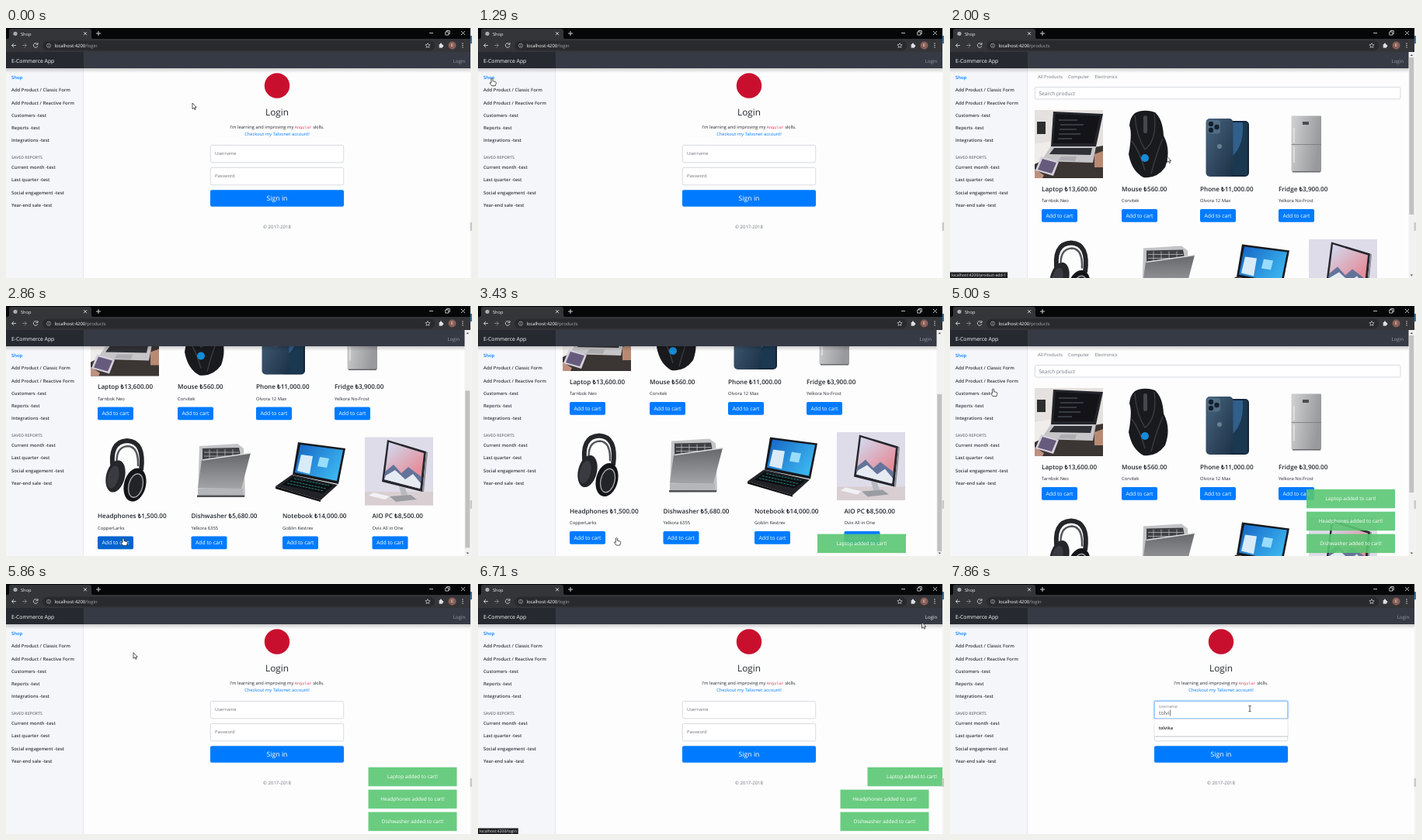
Recreate the animation shown at these times as an HTML page. Size 600 px wide and 323 px high, loop 8000 ms.

```html
<!DOCTYPE html>
<html lang="en">
<head>
<meta charset="utf-8">
<title>Shop</title>
<style>
  html, body { margin: 0; width: 100%; height: 100%; overflow: hidden; background: #fdfdfe; }
  svg { display: block; width: 100%; height: 100%; }
  text { font-family: 'Open Sans', 'Noto Sans', sans-serif; text-rendering: geometricPrecision; white-space: pre; }
  .semi { font-weight: 600; }
  .mid { text-anchor: middle; }
  .end { text-anchor: end; }
  .mono { font-family: 'Liberation Mono', monospace; font-size: 5.2px; fill: #e0405f; }
</style>
</head>
<body>
<svg id="stage" viewBox="0 0 600 323" preserveAspectRatio="none"></svg>
<script>
const STEP = 1000 / 7, LOOP = 8000;
const BLUE = '#007bff', INK = '#24282c', GRAY = '#70747a';

// ---- markup helpers ----
const text = (x, y, size, content, fill = INK, extra = '') =>
  `<text x="${x}" y="${y}" font-size="${size}" fill="${fill}" ${extra}>${content}</text>`;
const rect = (x, y, w, h, fill, extra = '') =>
  `<rect x="${x}" y="${y}" width="${w}" height="${h}" fill="${fill}" ${extra}/>`;
const poly = (points, fill, extra = '') => `<polygon points="${points}" fill="${fill}" ${extra}/>`;
const circle = (x, y, r, fill, extra = '') => `<circle cx="${x}" cy="${y}" r="${r}" fill="${fill}" ${extra}/>`;
const oval = (x, y, rx, ry, tilt, fill, extra = '') =>
  `<ellipse rx="${rx}" ry="${ry}" fill="${fill}" transform="translate(${x} ${y}) rotate(${tilt})" ${extra}/>`;
const line = (d, stroke, width = 1, extra = '') =>
  `<path d="${d}" fill="none" stroke="${stroke}" stroke-width="${width}" ${extra}/>`;
const shape = (d, fill, extra = '') => `<path d="${d}" fill="${fill}" ${extra}/>`;
const gradient = (id, from, to, vector) =>
  `<linearGradient id="${id}" ${vector}><stop stop-color="${from}"/><stop offset="1" stop-color="${to}"/></linearGradient>`;

const defs = `<defs>
  ${gradient('shadow', '#00000030', '#00000000', 'x2="0" y2="1"')}
  ${gradient('steel', '#d2d2d4', '#98999c', 'x2="1" y2="0.3"')}
  ${gradient('door', '#66676a', '#a3a4a7', 'x2="0" y2="1"')}
  ${gradient('navy', '#486580', '#1c3145', 'x2="1" y2="1"')}
  ${gradient('sky', '#cfe0f6', '#e48f9c', 'x2="0.6" y2="0.8"')}
  ${gradient('wave', '#1463c4', '#3bb4ef', 'x2="1" y2="0.6"')}
</defs>`;

// ---- browser window ----
function chrome() {
  return rect(0, 0, 598, 14, '#060708') + rect(0, 14, 598, 17, '#343539')
    + shape('M2 14Q4 14 4 11V4Q4 1 7 1H107Q110 1 110 4V11Q110 14 112 14Z', '#343539')
    + circle(12, 7.3, 2.6, '#a9abb0') + text(19, 9.5, 5.7, 'Shop', '#f0f0f1')
    + line('M100 5.2l4 4m0-4l-4 4M119 4v6m-3-3h6', '#e4e4e6', .9)
    + line('M545 6.5h5M565.8 5h4v4h-4zM567.3 5V3.5h4v4h-1.5M586 4l5 5m0-5l-5 5', '#e4e4e6', .8)
    + line('M13 22.5H7.5m2.6-2.6l-2.6 2.6 2.6 2.6', '#d5d6d8', .9)
    + line('M21 22.5h5.5m-2.6-2.6l2.6 2.6-2.6 2.6', '#85878b', .9)
    + line('M40.4 20.8A2.8 2.8 0 1 0 40.8 23.2M41 19v2.4h-2.4', '#d5d6d8', .9)
    + rect(47, 16.5, 505, 12.5, '#292a2d', 'rx="6.2"')
    + circle(55, 22.7, 2.5, 'none', 'stroke="#b5b7ba" stroke-width=".7"') + line('M55 22.3v1.8M55 21v.6', '#b5b7ba', .7)
    + `<text id="url" x="62.4" y="25" font-size="5.9" fill="#fff"></text>`
    + shape('M543 19.5l.9 2 2.2.2-1.7 1.5.5 2.2-1.9-1.2-1.9 1.2.5-2.2-1.7-1.5 2.2-.2z', 'none', 'stroke="#d5d6d8" stroke-width=".7"')
    + rect(557.7, 21, 4.4, 4.6, '#dedfe1') + circle(560, 20.7, 1.2, '#dedfe1') + circle(562.3, 23.2, 1.1, '#dedfe1')
    + circle(574.5, 22.5, 5, '#8b5f57') + text(574.5, 24.4, 5.4, 'E', '#fff', 'class="mid"')
    + [20, 22.5, 25].map(y => circle(588, y, .7, '#dcdcdc')).join('')
    + rect(598, 0, 2, 323, '#f3f3f4') + rect(598, 10, 2, 10, '#2a7ab8') + rect(597.5, 251, 2.5, 11, '#c9cacc');
}

function navbar() {
  return rect(0, 52, 598, 6, 'url(#shadow)') + rect(0, 31, 598, 21, '#363a45') + rect(0, 31, 100, 21, '#262930')
    + text(7, 44.5, 6.85, 'E-Commerce App', '#fff')
    + `<text id="loginLink" class="end" y="44.5" font-size="6.1">Login</text>`;
}

function sidebar() {
  const entry = (label, y, fill = '#34383d') => text(7, y + 2.1, 5.9, label, fill, 'class="semi"');
  const links = ['Shop', 'Add Product / Classic Form', 'Add Product / Reactive Form',
    'Customers -test', 'Reports -test', 'Integrations -test'];
  const reports = ['Current month -test', 'Last quarter -test', 'Social engagement -test', 'Year-end sale -test'];
  return rect(0, 52, 99, 271, '#f5f6fa') + rect(99, 52, .8, 271, '#e3e4e9')
    + links.map((label, i) => entry(label, 64 + i * 16.25, i ? undefined : BLUE)).join('')
    + text(7, 168.9, 5.2, 'SAVED REPORTS', GRAY, 'class="semi"')
    + reports.map((label, i) => entry(label, 180 + i * 16.2)).join('');
}

// ---- login page ----
function loginPage() {
  const field = y => rect(263.3, y, 171.4, 22.4, '#fff', 'rx="2" stroke="#ced2d8" stroke-width=".8"');
  return circle(349, 74.5, 16.2, '#c8102e')
    + text(349, 113, 11.8, 'Login', INK, 'class="mid"')
    + text(349, 130, 5.8, `I'm learning and improving my <tspan class="mono">Angular</tspan> skills.`, INK, 'class="mid"')
    + text(349, 138.7, 5.8, 'Checkout my Talvonet account!', BLUE, 'class="mid"')
    + field(151.4) + field(180.4) + text(269, 193.3, 5.7, 'Password', GRAY)
    + rect(263, 209.3, 172, 21.4, BLUE, 'rx="2"') + text(349, 223.2, 8.7, 'Sign in', '#fff', 'class="mid"')
    + text(349, 258.6, 6, '© 2017-2018', GRAY, 'class="mid"')
    + `<g id="label">${text(269, 164.2, 5.7, 'Username', GRAY)}</g>`
    + `<g id="focus">`
    + rect(262.6, 150.7, 172.8, 23.8, '#fff', 'rx="2.5" stroke="#bfdeff" stroke-width="2"')
    + rect(263.3, 151.4, 171.4, 22.4, '#fff', 'rx="2" stroke="#6fb0f5" stroke-width=".8"')
    + text(269, 160, 4.9, 'Username', GRAY)
    + `<text id="typed" x="269" y="169" font-size="6.9" fill="#50565c"></text>`
    + rect(0, 162.5, .6, 8, '#222', 'id="caret"') + `</g>`
    + `<g id="suggest">` + rect(264, 175.5, 171, 22.5, '#00000020', 'rx="1"')
    + rect(263, 174.5, 172, 22, '#fff', 'stroke="#d4d6d9" stroke-width=".5"')
    + text(268.5, 187.5, 5.7, 'tolvika', '#222', 'class="semi"') + `</g>`;
}

// ---- product page ----
const pictures = {
  laptop: rect(109, 106, 88, 88, '#3b3534') + poly('109,106 197,106 197,152 109,168', '#e4e1df')
    + rect(112, 121, 11, 16, '#2c2f2e') + poly('109,150 132,146 121,170 109,176', '#efece9')
    + poly('133,108 197,111 188,153 130,153', '#24252b') + poly('136,111 193,114 185,149 133,149', '#131318')
    + line('M140 119h24m-22 6h30m-31 6h22m-23 6h28m-29 6h18', '#59636d', 1)
    + poly('130,153 188,153 184,174 117,172', '#c6c5c8') + poly('134,155 183,155 181,164 128,163', '#303136')
    + poly('143,166 163,166 161,172 140,171', '#adacb0')
    + poly('109,182 121,190 119,194 109,194', '#bd9182')
    + poly('117,166 140,173 133,191 110,184', '#d6d2dc') + poly('119,169 137,174 131,188 113,183', '#665b7c')
    + poly('186,163 197,159 197,180 186,180', '#b98a72'),
  mouse: shape('M238 110Q249 104 264 109Q274 118 275 139Q285 158 277 180Q266 195 249 193Q234 185 230 163Q235 136 231 126Q232 115 238 110Z', '#191a1d')
    + line('M238 113Q240 140 251 157Q267 145 263 111M234 146Q245 161 251 184M274 143Q266 161 259 188', '#3a3c42', 1.4)
    + rect(249, 113, 5, 23, '#45474c', 'rx="2.5"') + circle(251, 168, 5, '#168bd8'),
  phone: rect(355, 120, 30, 72, '#15263a', 'rx="5"') + rect(357, 122, 26, 68, '#315f8c', 'rx="4"')
    + shape('M357 170Q379 158 377 122H383V190H361Q357 190 357 186Z', '#1a3850')
    + rect(329.5, 117, 35, 75, 'url(#navy)', 'rx="5"') + rect(331.5, 119, 16.5, 17.5, '#526e84', 'rx="4"')
    + [[336, 124], [336, 132], [343.5, 128]].map(([x, y]) => circle(x, y, 3.2, '#14212e')).join('') + circle(347, 153, 3, '#67818f'),
  fridge: rect(439.5, 113.5, 38.5, 72, 'url(#steel)', 'rx="1"') + line('M439.5 150.5H478', '#77787b', .8)
    + rect(454, 121, 8, 4, '#4b4d52') + line('M443 129v19M443 153v21', '#e8e8e9', 1.4) + rect(441, 185, 36, 1.5, '#66676a'),
  headphones: line('M138 212Q132 175 156 174Q179 175 174 212', '#25262a', 6)
    + line('M143 207Q140 182 157 181Q171 182 170 207', '#55575b', 2.5)
    + oval(141, 220, 12, 21, 14, '#25262a') + oval(138, 221, 7, 15, 14, '#3a3b40')
    + oval(166, 231, 14, 22, 14, '#141518') + oval(167, 232, 9, 15.5, 14, '#232428', 'stroke="#a4a6aa" stroke-width="1.4"'),
  dishwasher: poly('249,181 298,178 306,184 308,246 247,247', '#c3c4c6') + poly('253,184 300,183 303,199 253,200', '#3f4145')
    + line('M255 189h45M255 194h46M262 185v13M272 185v13M282 185v13M292 185v13', '#b9babd', .8)
    + poly('252,199 315,190 303,236 247,235', 'url(#door)') + line('M253 199L315 190', '#dcdddf', 1.5)
    + rect(247, 236, 58, 9, '#b5b6b9') + rect(246, 244.5, 61, 2.5, '#515256'),
  notebook: poly('376,176 437,184 428,230 369,218', '#17191d') + poly('379,179 434,186 426,226 372,215', 'url(#wave)')
    + poly('380,192 395,194 391,217 375,213', '#d9ebf7') + poly('404,195 416,197 413,209 401,207', '#9adcfb')
    + poly('368,218 427,231 405,251 347,233', '#222328') + poly('369,221 421,232 408,242 356,231', '#0c0d10')
    + line('M362 229l47 10M366 226l46 10M371 223l45 9', '#2b8f8a', .9, 'stroke-dasharray="3 1"')
    + poly('347,233 405,251 405,253 347,236', '#0b0b0d'),
  desktop: rect(462, 169.5, 88, 88, '#dfdce9') + rect(462, 240, 88, 17.5, '#d9cfd2')
    + poly('491,173 541,188 536,240 484,227', '#26272d') + poly('493,176 538,190 533,236 487,224', 'url(#sky)')
    + poly('488,214 499,205 509,216 518,208 535,221 533,236 487,224', '#647399')
    + poly('489,219 501,212 514,224 524,217 534,229 533,236 487,224', '#e6ebf3')
    + poly('506,233 514,235 518,247 510,247', '#b9bac0') + poly('494,246 521,244 529,250 502,253', '#9b9ca2')
    + poly('473,241 494,246 488,250 467,245', '#f2f1f5') + poly('541,188 543,189 538,240 536,240', '#8c8d95')
};

// Each row: vertical offset of its pictures, offset of its captions, and the items.
const rows = [
  { pictureY: 0, y: 0, items: [
    ['laptop', 118, 'Laptop ₺13,600.00', 'Tarnbok Neo'], ['mouse', 221, 'Mouse ₺560.00', 'Corvitek'],
    ['phone', 322, 'Phone ₺11,000.00', 'Olvora 12 Max'], ['fridge', 423, 'Fridge ₺3,900.00', 'Yelkora No-Frost']] },
  { pictureY: 103.5, y: 167, items: [
    ['headphones', 118, 'Headphones ₺1,500.00', 'CopperLarks'], ['dishwasher', 238.5, 'Dishwasher ₺5,680.00', 'Yelkora 6355'],
    ['notebook', 356, 'Notebook ₺14,000.00', 'Goblin Kestrev'], ['desktop', 471.5, 'AIO PC ₺8,500.00', 'Ovix All in One']] }
];

function product([id, x, title, maker], row) {
  return `<g transform="translate(0 ${row.pictureY})">${pictures[id]}</g>`
    + text(x, 210.8 + row.y, 8.15, title, INK, 'class="semi"') + text(x, 225 + row.y, 5.85, maker)
    + rect(x, 234 + row.y, 46, 16.8, BLUE, `rx="1.8" id="buy-${id}"`)
    + text(x + 23, 244.9 + row.y, 6.85, 'Add to cart', '#fff', 'class="mid"');
}

function productPage() {
  return `<g id="scroller">`
    + text(113, 64.5, 5.8, 'All Products', GRAY) + text(152, 64.5, 5.8, 'Computer', GRAY) + text(186.5, 64.5, 5.8, 'Electronics', GRAY)
    + rect(109.4, 76.4, 470.5, 15.5, '#fff', 'rx="1.8" stroke="#ced2d8" stroke-width=".8"')
    + text(114.5, 86.8, 6.6, 'Search product', GRAY)
    + rows.map(row => row.items.map(item => product(item, row)).join('')).join('') + `</g>`;
}

const scrollbar = rect(590.5, 31, 7.5, 292, '#f1f1f1') + shape('M592.5 36l1.8-2 1.8 2zM592.5 318.5l1.8 2 1.8-2z', '#555')
  + rect(591.3, 38, 5.9, 203, '#c1c1c1', 'id="thumb"');

// ---- overlays ----
const toasts = [
  { name: 'Laptop', enter: 24, leave: 47 },
  { name: 'Headphones', enter: 29, leave: 51 },
  { name: 'Dishwasher', enter: 33, leave: 54 }
];
const toastMarkup = toasts.map((toast, i) => `<g id="toast${i}">` + rect(0, 0, 114, 24.5, '#5ac773', 'opacity=".9"')
  + text(57, 14.6, 6.5, `${toast.name} added to cart!`, '#fff', 'class="mid"') + `</g>`).join('');

const cursors = {
  arrow: shape('M0 0V7.6L1.8 6 3 8.6 4.2 8 3.1 5.6H5.3Z', '#fff', 'stroke="#111" stroke-width=".7"'),
  hand: shape('M-1 .6Q0-.8 1 .6V3.6L4.8 4.6Q5.5 5 5.3 6.2L4.4 9.6H-.4L-3 6Q-2.6 4.8-1 5.9Z', '#fff', 'stroke="#111" stroke-width=".7"'),
  beam: line('M-1.6-3.8Q0-3.8 0-3Q0-3.8 1.6-3.8M0-3V3M-1.6 3.8Q0 3.8 0 3Q0 3.8 1.6 3.8', '#222', .8)
};

const stage = document.getElementById('stage');
stage.innerHTML = defs + rect(0, 0, 600, 323, '#fdfdfe')
  + `<g id="login">${loginPage()}</g><g id="products">${productPage()}</g>`
  + sidebar() + navbar() + `<g id="scrollbar">${scrollbar}</g>` + toastMarkup + chrome()
  + `<g id="status">${rect(0, 315.5, 0, 7.5, '#202124', 'id="statusBox"')}<text id="statusText" x="2" y="321" font-size="5.1" fill="#e6e6e6"></text></g>`
  + `<g id="cursor">${Object.entries(cursors).map(([kind, mark]) => `<g id="${kind}">${mark}</g>`).join('')}</g>`;

const el = id => document.getElementById(id);
const set = (id, name, value) => el(id).setAttribute(name, value);
const show = (id, visible) => set(id, 'display', visible ? 'inline' : 'none');
const within = (value, from, to) => value >= from && value <= to;

// ---- timeline, measured in steps ----
const cursorPath = [
  [0, 240, 97, 'arrow'], [3, 190, 116, 'arrow'], [5, 70, 99, 'hand'], [8, 18, 65, 'hand'], [10, 18, 65, 'hand'],
  [11, 50, 80, 'hand'], [12, 110, 100, 'arrow'], [14, 279.5, 166, 'arrow'], [16, 141, 242, 'hand'], [17, 141, 242, 'hand'],
  [20, 151, 300, 'hand'], [23, 151, 300, 'hand'], [27, 260.5, 298, 'hand'], [33, 260.5, 298, 'hand'],
  [35, 55.5, 107, 'hand'], [36, 52, 96, 'hand'], [37, 52, 96, 'arrow'], [40, 60, 100, 'arrow'],
  [45, 580, 43, 'hand'], [46, 580, 43, 'hand'], [47, 571.5, 49.5, 'arrow'], [51, 386, 161, 'beam'], [55, 386, 161, 'beam']
];
const scrollPath = [[16, 0], [17, 20], [20, 103.5], [21, 110], [30, 110], [33, 0]];
const hovers = { laptop: [16, 17], headphones: [19, 23], dishwasher: [27, 32] };
const statuses = [[12, 15, 'product-add-1'], [36, 38, 'product-add-2'], [45, 49, 'login']];

function along(keys, step) {
  const next = keys.findIndex(key => key[0] > step);
  if (next === 0) return keys[0];
  if (next < 0) return keys[keys.length - 1];
  const a = keys[next - 1], b = keys[next], k = (step - a[0]) / (b[0] - a[0]);
  return a.map((v, i) => typeof v === 'number' ? v + (b[i] - v) * k : v);
}

function draw(step) {
  const onLogin = step < 10 || step >= 37;
  show('login', onLogin);
  show('products', !onLogin);
  show('scrollbar', !onLogin);
  el('url').innerHTML = `localhost:4200<tspan fill="#a6a9ad">/${onLogin ? 'login' : 'products'}</tspan>`;
  set('loginLink', 'x', onLogin ? 591.3 : 584);
  set('loginLink', 'fill', within(step, 45, 49) ? '#e4e5e7' : '#9a9da4');

  const scroll = along(scrollPath, step)[1];
  set('scroller', 'transform', `translate(0 ${-scroll})`);
  set('thumb', 'y', 38 + scroll * .69);
  for (const id in hovers) set('buy-' + id, 'fill', within(step, ...hovers[id]) ? '#0064cf' : BLUE);

  toasts.forEach((toast, i) => {
    const newer = toasts.filter((other, j) => j > i && other.enter <= step).length;
    const overshoot = -22 * Math.max(0, 1 - (step - toast.enter));
    const exit = 35 * Math.max(0, step - toast.leave + 1);
    show('toast' + i, within(step, toast.enter, toast.leave));
    set('toast' + i, 'transform', `translate(${(onLogin ? 466.5 : 459) + overshoot + exit} ${294.6 - 28.9 * newer})`);
  });

  const status = statuses.find(([from, to]) => within(step, from, to));
  show('status', status);
  if (status) {
    el('statusText').textContent = 'localhost:4200/' + status[2];
    set('statusBox', 'width', el('statusText').getComputedTextLength() + 4);
  }

  const typed = 'tolvi'.slice(0, Math.max(0, step - 50));
  show('focus', step >= 51);
  show('label', step < 51);
  show('suggest', step >= 51);
  el('typed').textContent = typed;
  set('caret', 'x', 269.5 + (typed ? el('typed').getComputedTextLength() : 0));

  const [, x, y, kind] = along(cursorPath, step);
  set('cursor', 'transform', `translate(${x} ${y})`);
  for (const name in cursors) show(name, name === kind);
}

const start = performance.now();
let shown = -1;
function tick() {
  const time = (performance.now() - start) % LOOP;
  const step = Math.floor((time + 4) / STEP) % 56;
  if (step !== shown) draw(shown = step);
  requestAnimationFrame(tick);
}
tick();
</script>
</body>
</html>
```
